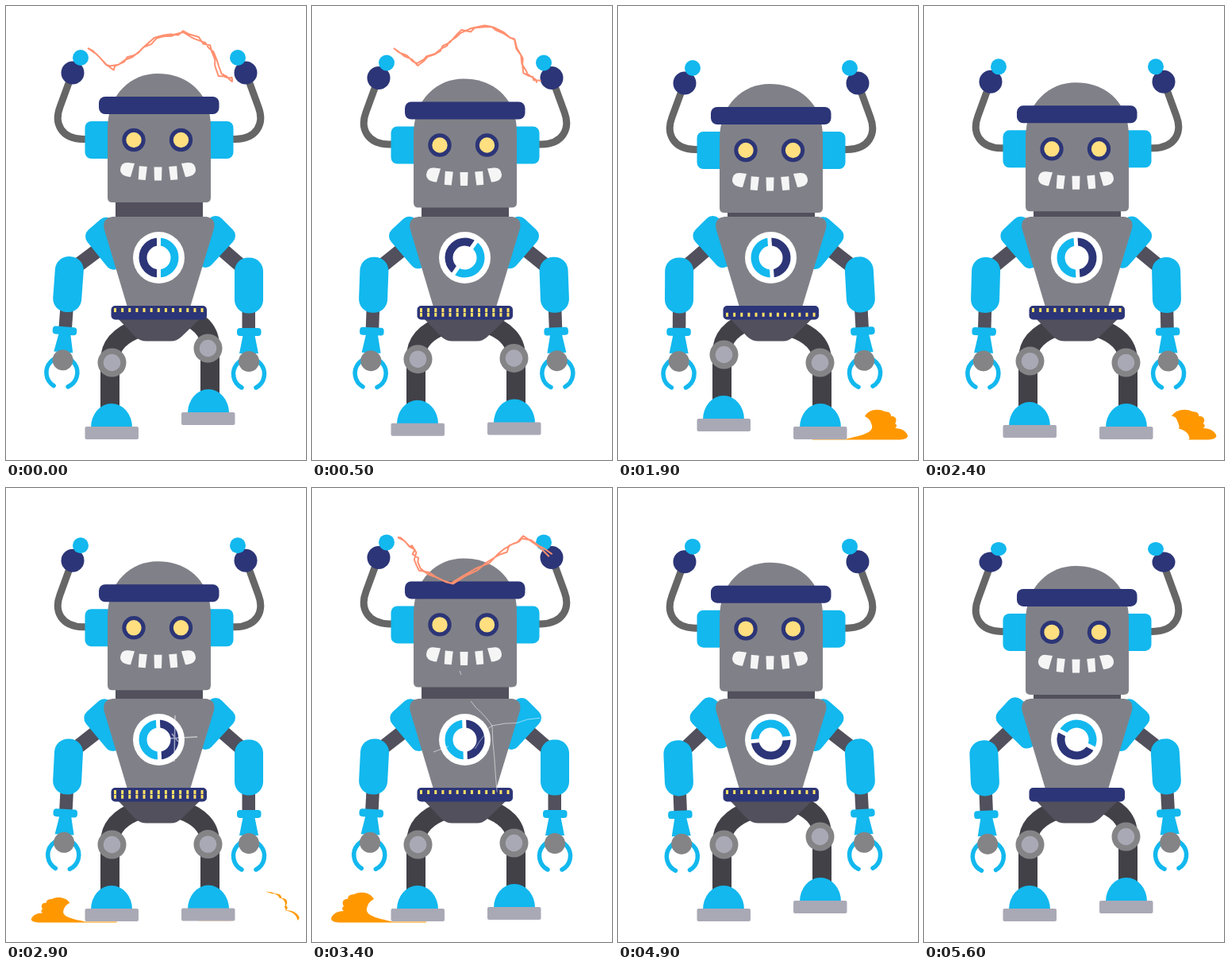
Write an HTML page that moves like this. It is 378 px wide and 571 px high and loops after 5.7 s.

```html
<!DOCTYPE html>
<html lang="en">
<head>
<meta charset="utf-8">
<title>Robot</title>
<style>
  html, body { margin: 0; width: 100%; height: 100%; overflow: hidden; background: #fff; }
  svg { display: block; width: 378px; height: 571px; }
  .line { fill: none; stroke-linejoin: round; }
  .gray { fill: #808188; } .joint { fill: #848486; } .pale { fill: #a9a9b6; }
  .dark { fill: #51505c; } .navy { fill: #2c3577; } .cyan { fill: #12b8ee; }
  .crack { fill: none; stroke: #fff; stroke-opacity: .55; }
</style>
</head>
<body>
<svg viewBox="0 0 378 571">
  <defs>
    <path id="wave" d="M245 544.5H288C302 541 322 538 320 528Q318 519 311 516C316 507 328 506 336 510Q344 510 344 516C350 515 352 521 349 525Q353 528 349 531C357 531 364 535 365 541Q364 545 355 545.5H245Z"/>
    <g id="leg">
      <path class="line" d="M131 515V446C131 424 148 412 168 405" stroke="#424148" stroke-width="24"/>
      <path class="cyan" d="M107 530a26 30 0 0 1 52 0Z"/>
      <rect class="pale" x="99.5" y="529" width="67.5" height="16" rx="2"/>
      <circle class="joint" cx="133.5" cy="448.5" r="18"/>
      <circle class="pale" cx="133.5" cy="448.5" r="10.7"/>
    </g>
    <g id="arm">
      <path class="line" d="M122 296.5L77 335.5" stroke="#51505c" stroke-width="18"/>
      <path class="cyan" d="M119 275L105 289L132 318L142 296Z" stroke="#12b8ee" stroke-width="22" stroke-linejoin="round"/>
      <rect class="dark" x="69" y="375" width="16.5" height="33"/>
      <rect class="cyan" x="59" y="316.5" width="36" height="70" rx="17"/>
      <path class="cyan" d="M70 412H84L89 437H65Z"/>
      <rect class="cyan" x="61.5" y="405" width="30.5" height="10" rx="4"/>
      <path class="line" d="M68 480a19.5 19.5 0 1 1 18 0" stroke="#12b8ee" stroke-width="5.5" stroke-linecap="round"/>
      <circle class="joint" cx="77" cy="447" r="13"/>
    </g>
    <g id="side">
      <path class="line" d="M104 167.500H97C70 167 60 148 68 127L83 86" stroke="#666" stroke-width="9"/>
      <rect class="cyan" x="99.5" y="145" width="38" height="47" rx="8"/>
      <g class="balls">
        <circle class="navy" cx="84" cy="84" r="14.5"/>
        <circle class="cyan" cx="94" cy="65" r="10"/>
      </g>
    </g>
    <path id="lobe" d="M162 198L157 215Q144 214 144 205.500Q145 196 154 197Z"/>
    <path id="tooth" d="M186.500 202.500H196.500L196 219.500H187Z"/>
  </defs>

  <g id="dustL"/>
  <g id="dustR"/>
  <use id="legL" href="#leg"/>
  <use id="legR" href="#leg"/>
  <path class="dark" d="M140 392H246L221 416Q215 421.500 208 421.500H177Q169 421.500 163 416Z"/>
  <use id="armL" href="#arm"/>
  <use id="armR" href="#arm"/>
  <rect class="dark" x="138" y="235" width="110" height="33"/>
  <path class="gray" d="M134 265H251Q265 266 262 280L231 382H154L123.500 280Q121 267 134 265Z"/>
  <circle cx="192.5" cy="316.5" r="32.5" fill="#fff"/>
  <g id="logo" class="line" stroke-width="10">
    <path d="M192.500 296.500a20 20 0 0 0 0 40" stroke="#2c3577"/>
    <path d="M192.500 296.500a20 20 0 0 1 0 40" stroke="#12b8ee"/>
    <path d="M192.500 289V344" stroke="#fff" stroke-width="5"/>
  </g>
  <rect class="navy" x="132.5" y="377" width="120.5" height="17.5" rx="5"/>
  <g class="line" stroke="#ffe066" stroke-width="5" stroke-dasharray="3 6.13">
    <path id="dotsUp" d="M136 382.500H249"/>
    <path id="dotsDown" d="M136 388.300H249"/>
  </g>

  <g id="head">
    <use href="#side"/>
    <use href="#side" transform="matrix(-1 0 0 1 386 0)"/>
    <path class="gray" d="M128 155C128 110 158 85 191 85C229 85 258 110 258 152V241q0 6-6 6H134q-6 0-6-6Z"/>
    <rect class="navy" x="117" y="114" width="151.5" height="22" rx="8"/>
    <g stroke="#2c3577" stroke-width="5" fill="#ffdf80">
      <circle cx="161" cy="168.5" r="12.2"/>
      <circle cx="220.5" cy="168.5" r="12.2"/>
    </g>
    <g fill="#f5f5f6">
      <use href="#lobe"/>
      <use href="#lobe" transform="matrix(-1 0 0 1 383 0)"/>
      <use href="#tooth"/>
      <use href="#tooth" transform="rotate(5.3 191.5 0)"/>
      <use href="#tooth" transform="rotate(-5.3 191.5 0)"/>
    </g>
  </g>
  <path id="faceCrack" class="crack" d="M136 162V167M139 195L158 220M158 197L147 215M134 231L143 234M165 190L170 200"/>
  <path id="starCrack" class="crack" stroke-width="1.5" d="M213 286L212 344M204 315L241 313M209 309L217 319"/>
  <path id="chestCrack" class="crack"/>
  <path id="bolt" class="line" stroke="#ff9070" stroke-width="2"/>
</svg>
<script>
const $ = id => document.getElementById(id);
const move = (id, value) => $(id).setAttribute('transform', value);
const show = (id, on) => $(id).style.display = on ? '' : 'none';
const noise = n => { const s = Math.sin(n * 127.1) * 43758.5453; return s - Math.floor(s); };

// Cosine-eased value through time/value pairs.
function key(t, ...k) {
  if (t <= k[0]) return k[1];
  for (let i = 2; i < k.length; i += 2)
    if (t < k[i]) {
      const p = (t - k[i - 2]) / (k[i] - k[i - 2]);
      return k[i - 1] + (k[i + 1] - k[i - 1]) * (1 - Math.cos(Math.PI * p)) / 2;
    }
  return k[k.length - 1];
}

// Jagged line along a few [x, y] corners.
function jag(corners, rough, seed) {
  let d = 'M' + corners[0];
  for (let i = 1; i < corners.length; i++) {
    const [x0, y0] = corners[i - 1], [x1, y1] = corners[i];
    for (let n = 1; n <= 4; n++) {
      const shake = k => (noise(seed * 97 + i * 11 + n + k) - .5) * rough;
      d += `L${x0 + (x1 - x0) * n / 4 + shake(0)} ${y0 + (y1 - y0) * n / 4 + shake(.5)}`;
    }
  }
  return d;
}

// Two entwined strands whose middle sways from step to step.
function bolt(corners, step, sway) {
  const last = corners.length - 1;
  const bent = corners.map(([x, y], i) =>
    [x, y - sway * noise(step) * (step > 0) * Math.sin(Math.PI * i / last)]);
  return jag(bent, 6, step) + jag(bent, 6, step + 50);
}

const arch = [[103, 53], [133, 78], [160, 62], [190, 41], [224, 33], [257, 51], [269, 86], [286, 95]];
const sag = [[108, 62], [127, 75], [136, 101], [178, 121], [236, 84], [266, 62], [300, 84]];
const hub = [227, 299];
$('chestCrack').setAttribute('d',
  [[198, 266], [288, 290], [232, 382], [205, 328]].map((end, i) => jag([hub, end], 5, i)).join('') +
  'M153 332L172 325M186 230L188 235');

// A splash grows, then a white copy slides outward and leaves only its crest.
for (const id of ['dustL', 'dustR'])
  $(id).innerHTML = '<use href="#wave" fill="#ff9800"/><use href="#wave" fill="#fff" stroke="#fff" stroke-width="5"/>';

function drawDust(id, age, side) {
  show(id, age >= 0 && age < 2300);
  const sx = key(age, 0, 0, 400, .9, 900, 1, 1800, 1.06);
  const sy = key(age, 0, .1, 400, .83, 900, 1);
  move(id, `${side} translate(288 545) scale(${sx} ${sy}) translate(-288 -545)`);
  const eraser = $(id).lastChild;
  eraser.style.display = age > 1100 ? '' : 'none';
  eraser.setAttribute('transform', `translate(${key(age, 1100, -80, 1800, -6.5, 2200, -3)} 2.500)`);
}

function draw(t) {
  const ending = t >= 5500;
  const tiltL = key(t, 0, 4.2, 1000, 0, 1900, .3, 2900, 3, 3600, 3, 4250, -2.4);
  const tiltR = key(t, 0, 0, 1000, 4.2, 1300, 3.2, 1900, 3.2, 2800, 0, 3600, 0, 4250, 3.2);
  move('armL', `rotate(${tiltL} 97.5 371.5)`);
  move('armR', `matrix(-1 0 0 1 383 0) rotate(${tiltR} 97.5 371.5)`);
  move('legL', `translate(0 ${-key(t, 200, 0, 1000, 14, 1900, 10, 2600, 0)})`);
  move('legR', `matrix(-1 0 0 1 388 ${-key(t, 0, 18, 800, 0, 2700, 0, 3400, 2, 4250, 10)})`);
  move('head', `translate(0 ${key(t, 0, 0, 1000, 13, 1900, 13, 3850, 2, 5700, 13)})`);
  move('logo', `rotate(${key(t, 0, 0, 1700, 176, 3500, 178, 4300, 240, 5600, 297)} 192.5 316.5)`);
  for (const balls of document.querySelectorAll('.balls'))
    balls.setAttribute('transform', ending ? 'matrix(1 0 0 .87 0 7.15)' : '');

  const beat = t % 800;
  show('dotsUp', !ending && (beat < 300 || beat >= 500));
  show('dotsDown', !ending && beat >= 300 && beat < 600);

  drawDust('dustR', t - 900, '');
  drawDust('dustL', t - 2500, 'matrix(-1 0 0 1 389 1)');

  show('faceCrack', t >= 800 && t < 1400);
  show('starCrack', t >= 2800 && t < 3100);
  show('chestCrack', t >= 3100 && t < 3900);

  const step = t / 100;
  $('bolt').setAttribute('d',
    t < 700 ? bolt(arch, step, 18) : t >= 3200 && t < 3800 ? bolt(sag, step - 34, 8) : '');
}

const start = performance.now();
function tick() {
  draw(Math.floor((performance.now() - start) % 5700 / 100) * 100);
  requestAnimationFrame(tick);
}
tick();
</script>
</body>
</html>
```
